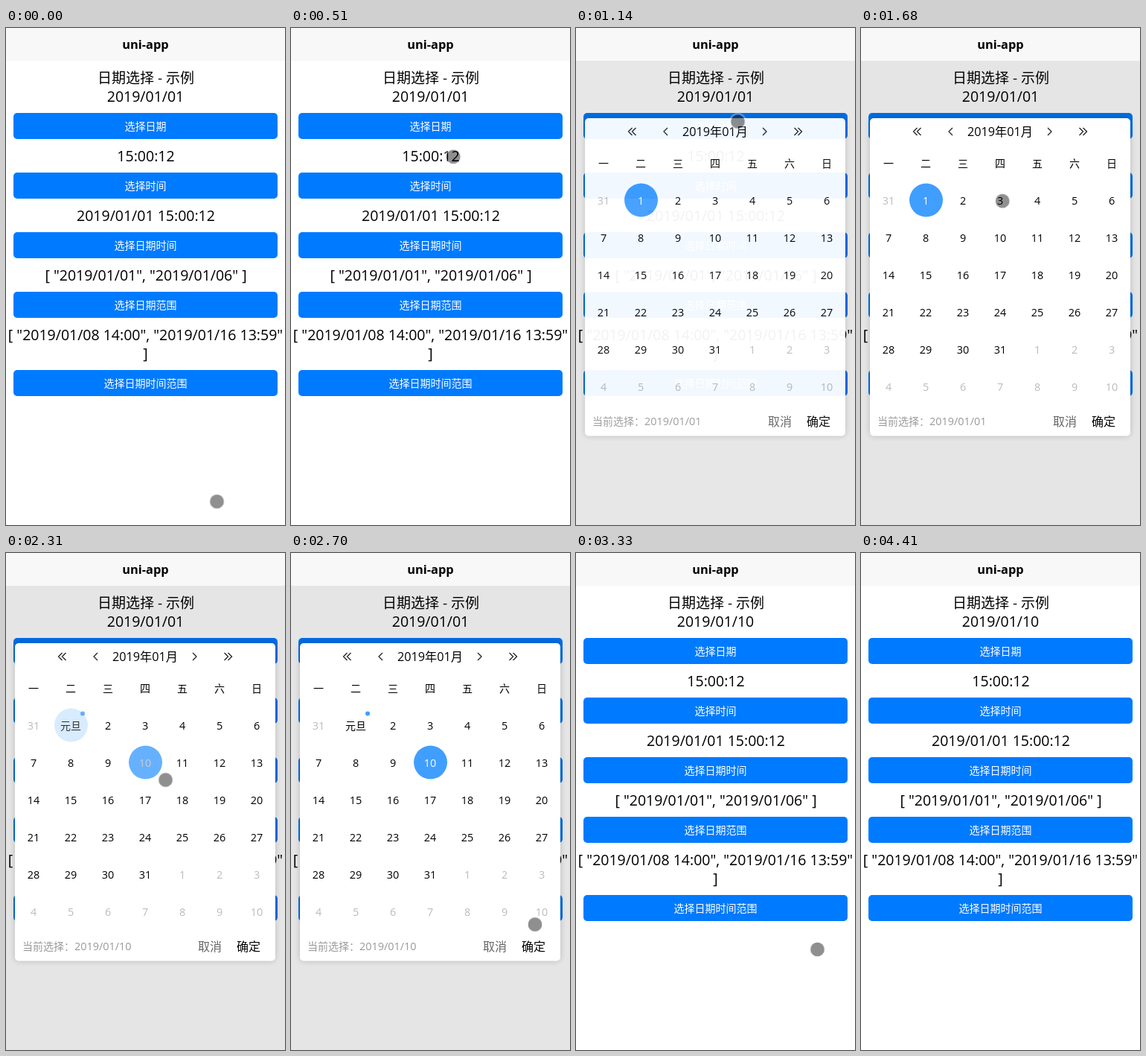
Animation of 375 by 667 pixels, one loop 4.81 s. Source, as an HTML page:

```html
<!DOCTYPE html>
<html lang="zh-CN">
<head>
<meta charset="utf-8">
<title>日期选择</title>
<style>
html, body { margin: 0; width: 100%; height: 100%; overflow: hidden; background: #fff; }
svg { display: block; width: 375px; height: 667px; }
text { font-family: "Open Sans", "Noto Sans CJK SC", "Noto Sans CJK", sans-serif; font-size: 14px; white-space: pre; }
.mid { text-anchor: middle; }
.value { font-size: 19.5px; }
.heading { font-size: 19px; }
.button rect { fill: #007aff; }
.button text { fill: #fff; }
.day { font-size: 14.4px; }
.muted { fill: #bbb; }
.hint { fill: #999; }
.action { font-size: 16px; }
.icon { fill: none; stroke: #222; stroke-width: 1.3; }
.sheet { filter: drop-shadow(0 0 4px rgba(0, 0, 0, .2)); }
.accent { fill: #409eff; }

/* One loop is 4810 ms; every animation shares it. */
.button.tapped rect, .button.tapped text, .modal, .before, .after, .old, .new,
.fade-in, .fade-out, .to-white, .to-black, .click { animation: 4810ms step-end infinite; }
.button.tapped rect { animation-name: press; }
.button.tapped text { animation-name: press-label; }
.modal { animation-name: modal; }
.before { animation-name: before; }
.after { animation-name: after; }
.old { animation-name: old; }
.new { animation-name: new; }
.fade-in { animation-name: fade-in; }
.fade-out { animation-name: fade-out; }
.to-white { animation-name: to-white; }
.to-black { animation-name: to-black; }
.click { animation-name: click; mix-blend-mode: multiply; }
.pointer { animation: move 4810ms linear infinite; }
.dot { animation: dot 4810ms step-end infinite; }

@keyframes press { 0%, 22.24%, 100% { fill: #007aff; } 20.58% { fill: #0062cc; } }
@keyframes press-label { 0%, 22.24%, 100% { fill: #fff; } 20.58% { fill: rgba(255, 255, 255, .6); } }
@keyframes modal {
  0%, 69.23%, 100% { opacity: 0; }
  22.24% { opacity: .6; }
  23.69% { opacity: .95; }
  25.36% { opacity: 1; }
}
@keyframes before { 0% { opacity: 1; } 69.23%, 100% { opacity: 0; } }
@keyframes after { 0% { opacity: 0; } 69.23%, 100% { opacity: 1; } }
@keyframes old { 0% { opacity: 1; } 46.36%, 100% { opacity: 0; } }
@keyframes new { 0% { opacity: 0; } 46.36%, 100% { opacity: 1; } }
@keyframes fade-in { 0% { opacity: 0; } 46.36% { opacity: .4; } 48.02% { opacity: .8; } 49.48%, 100% { opacity: 1; } }
@keyframes fade-out { 0% { opacity: 1; } 46.36% { opacity: .6; } 48.02% { opacity: .2; } 49.48%, 100% { opacity: 0; } }
@keyframes to-white { 0% { fill: #000; } 46.36% { fill: #666; } 48.02% { fill: #ccc; } 49.48%, 100% { fill: #fff; } }
@keyframes to-black { 0% { fill: #fff; } 46.36% { fill: #999; } 48.02% { fill: #333; } 49.48%, 100% { fill: #000; } }
@keyframes click { 0%, 69.23%, 100% { opacity: 0; } 65.69% { opacity: 1; } }
@keyframes dot { 0%, 69.23% { opacity: 1; } 65.69%, 91.68%, 100% { opacity: 0; } }
@keyframes move {
  0% { transform: translate(283.5px, 635.5px); }
  1.45% { transform: translate(283.5px, 635.5px); animation-timing-function: steps(2, jump-start); }
  4.49% { transform: translate(275px, 590px); animation-timing-function: steps(4, jump-start); }
  10.56% { transform: translate(224px, 205px); animation-timing-function: steps(2, jump-start); }
  13.6% { transform: translate(212.5px, 140.5px); }
  13.92% { transform: translate(212.5px, 140.5px); animation-timing-function: steps(3, jump-start); }
  18.61%, 28.47% { transform: translate(217.5px, 125.5px); }
  28.48% { transform: translate(217.5px, 125.5px); animation-timing-function: steps(6, jump-start); }
  38.46% { transform: translate(176.5px, 285.5px); }
  39.91% { transform: translate(176.5px, 285.5px); animation-timing-function: steps(3, jump-start); }
  44.91% { transform: translate(184.5px, 280.5px); }
  46.36% { transform: translate(184.5px, 280.5px); animation-timing-function: steps(2, jump-start); }
  49.63% { transform: translate(214.5px, 304.5px); animation-timing-function: steps(5, jump-start); }
  57.75% { transform: translate(328px, 498.5px); }
  57.79% { transform: translate(328px, 498.5px); animation-timing-function: steps(4, jump-start); }
  64.2% { transform: translate(324.5px, 532px); }
  83.78% { transform: translate(324.5px, 532px); animation-timing-function: steps(5, jump-start); }
  91.68%, 100% { transform: translate(316.5px, 656px); }
}
</style>
</head>
<body>
<svg viewBox="0 0 375 667">
  <rect width="375" height="44" fill="#f8f8f8"/>
  <text class="mid" x="187.5" y="28" style="font-size:16.4px;font-weight:700">uni-app</text>

  <g class="mid">
    <text class="heading" x="188" y="74">日期选择 - 示例</text>
    <text class="value before" x="187.5" y="99">2019/01/01</text>
    <text class="value after" x="187.5" y="99">2019/01/10</text>
    <text class="value" x="188" y="179">15:00:12</text>
    <text class="value" x="188" y="259">2019/01/01 15:00:12</text>
    <text class="value" x="188" y="339">[ "2019/01/01", "2019/01/06" ]</text>
    <text class="value" x="187.5" y="419">[ "2019/01/08 14:00", "2019/01/16 13:59"</text>
    <text class="value" x="187.5" y="444">]</text>
  </g>
  <g id="buttons"></g>

  <g class="modal">
    <rect y="44" width="375" height="623" fill-opacity=".1"/>
    <rect class="sheet" x="12" y="121" width="350" height="426.5" rx="5" fill="#fff"/>
    <path class="icon" d="M75.500 134l-5 5 5 5M80.500 134l-5 5 5 5M123 134l-5 5 5 5M251 134l5 5-5 5M293.500 134l5 5-5 5M298.500 134l5 5-5 5"/>
    <text class="mid" x="187" y="144.500" style="font-size:16.2px">2019年01月</text>
    <circle class="accent fade-out" cx="87.500" cy="231" r="22.500"/>
    <circle class="accent fade-in" cx="187.500" cy="281" r="22.500"/>
    <circle class="accent fade-in" cx="103" cy="215.500" r="3"/>
    <g id="days" class="mid"></g>
    <text class="hint" x="22" y="533">当前选择：</text>
    <text class="hint day old" x="92" y="533">2019/01/01</text>
    <text class="hint day new" x="92" y="533">2019/01/10</text>
    <text class="action" x="258" y="534" fill="#666">取消</text>
    <text class="action" x="310" y="534">确定</text>
  </g>

  <g class="pointer click">
    <circle r="11" fill="#fff36b"/>
    <circle r="9.5" fill="#bec26b"/>
  </g>
  <g class="pointer">
    <g class="dot">
      <circle r="9.5" fill-opacity=".44"/>
      <circle r="10.4" fill="none" stroke="#fff" stroke-opacity=".4" stroke-width="1.8"/>
    </g>
  </g>
</svg>
<script>
const label = (x, y, text, cls = "") => `<text class="${cls}" x="${x}" y="${y}">${text}</text>`;

const buttons = [[114, "日期"], [194, "时间"], [274, "日期时间"], [354, "日期范围"], [459, "日期时间范围"]];
document.getElementById("buttons").innerHTML = buttons.map(([y, name], i) =>
  `<g class="button mid ${i ? "" : "tapped"}">
    <rect x="10" y="${y}" width="355" height="35" rx="5"/>
    ${label(187.5, y + 23, "选择" + name)}
  </g>`).join("");

let days = [..."一二三四五六日"].map((name, i) => label(37 + 50 * i, 187, name)).join("");
for (let i = 0; i < 42; i++) {
  const x = 37 + 50 * (i % 7), y = 237 + 50 * Math.floor(i / 7);
  const day = (i + 30) % 31 + 1;
  if (i === 1) {
    days += label(x, y, 1, "day old to-black") + label(x, y, "元旦", "new-day");
  } else {
    const cls = i === 0 || i > 31 ? "muted" : i === 10 ? "to-white" : "";
    days += label(x, y, i === 0 ? 31 : day, "day " + cls);
  }
}
document.getElementById("days").innerHTML = days;
</script>
<style>
/* The holiday label appears and darkens at once. */
.day.old.to-black { animation-name: old; fill: #fff; }
.new-day { animation: new 4810ms step-end infinite, to-black 4810ms step-end infinite; }
.pointer.click { animation: move 4810ms linear infinite, click 4810ms step-end infinite; }
</style>
</body>
</html>
```
